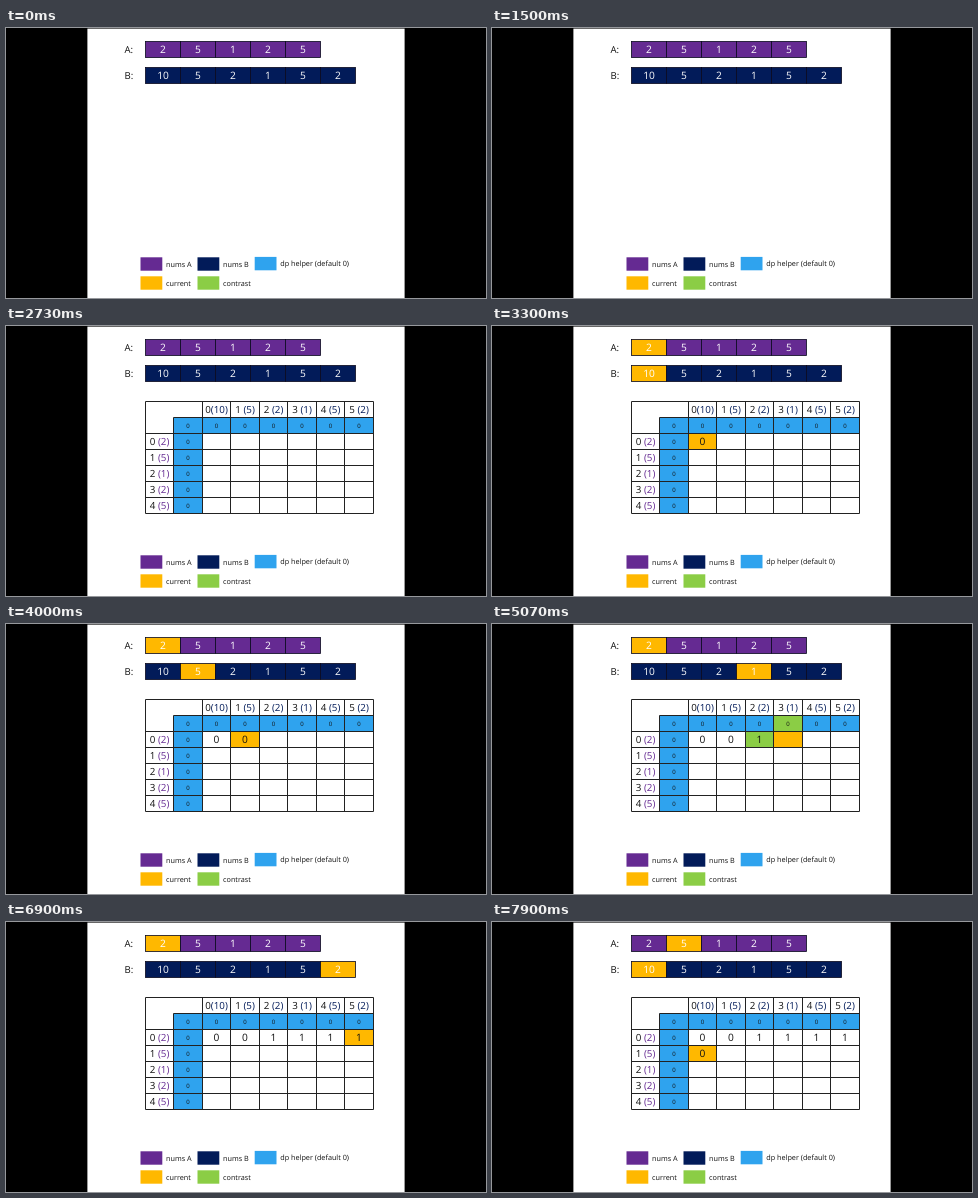
Recreate the animation shown at these times as an HTML page. Size 480 by 270 pixels, loop 8000 ms.

```html
<!DOCTYPE html>
<html lang="en">
<head>
<meta charset="utf-8">
<title>Longest common run table</title>
<style>
html, body { margin: 0; width: 100%; height: 100%; overflow: hidden; background: #000; }
svg { display: block; width: 100vw; height: 100vh; }
text { font-family: "Open Sans", "Noto Sans", sans-serif; text-rendering: geometricPrecision; }
</style>
</head>
<body>
<svg id="stage" viewBox="0 0 480 270"></svg>
<script>
const NS = "http://www.w3.org/2000/svg";
const PURPLE = "#652a92", NAVY = "#021b59", BLUE = "#2fa3ee", ORANGE = "#ffb800", GREEN = "#8bcd45";
const INK = "#111", LINE = "#222";
const A = [2, 5, 1, 2, 5], B = [10, 5, 2, 1, 5, 2];
const LOOP = 8000, TABLE_AT = 2050, CELLS_AT = 2800, STEP = 750, SOLVE = 330;

const stage = document.getElementById("stage");

function add(parent, tag, attrs, content = "") {
  const el = document.createElementNS(NS, tag);
  for (const key in attrs) el.setAttribute(key, attrs[key]);
  el.textContent = content;
  parent.appendChild(el);
  return el;
}

const box = (parent, x, y, width, height, fill) =>
  add(parent, "rect", { x, y, width, height, fill });

const label = (parent, x, y, size, fill, content, anchor = "middle") =>
  add(parent, "text", { x, y, fill, "font-size": size, "text-anchor": anchor }, content);

const rule = (parent, d) =>
  add(parent, "path", { d, fill: "none", stroke: LINE, "stroke-width": 1 });

// Centre of the pixel that holds v, for sharp one pixel lines.
const snap = v => Math.floor(v) + 0.5;

function drawArray(name, nums, y, fill) {
  label(stage, 118.5, y + 11.9, 9.6, INK, name + ":", "start");
  return nums.map((n, i) => {
    const left = snap(139 + i * 35.15), right = snap(139 + (i + 1) * 35.15);
    const cell = box(stage, left, y, right - left, 16, fill);
    cell.setAttribute("stroke", "#0b0a20");
    cell.setAttribute("stroke-width", 0.8);
    label(stage, (left + right) / 2, y + 11.9, 10.2, "#fff", n);
    return cell;
  });
}

function drawHeading(x, y, index, gap, value, color) {
  const text = label(table, x, y, 9.8, INK, index + gap);
  add(text, "tspan", { fill: color }, `(${value})`);
}

function drawLegend(x, y, color, name) {
  box(stage, x, y, 21.8, 13.4, color);
  label(stage, x + 25.6, y + 9.2, 7.25, INK, name, "start");
}

box(stage, 81.4, 0.6, 317.2, 270, "#fff");
const cellsA = drawArray("A", A, 13.5, PURPLE);
const cellsB = drawArray("B", B, 39.5, NAVY);

// Grid row 0 holds headings, row 1 and column 1 hold the zero helpers.
const table = add(stage, "g", {});
const colX = c => snap(139 + c * 28.5);
const rowY = r => 75.5 + r * 16;
const grid = [];
for (let r = 0; r < 7; r++) {
  grid.push([]);
  for (let c = 0; c < 8; c++) {
    const x = colX(c), y = rowY(r), w = colX(c + 1) - x;
    const mx = x + w / 2;
    const helper = r === 1 && c > 0 || c === 1 && r > 0;
    const base = helper ? BLUE : "#fff";
    const rect = box(table, x, y, w, 16, base);
    const text = helper ? label(table, mx, y + 10, 6, INK, "0")
                        : label(table, mx, y + 11.6, 10.2, INK, "");
    grid[r].push({ rect, text, base });
    if (r === 0 && c > 1) drawHeading(mx, y + 11.7, c - 2, c === 2 ? "" : " ", B[c - 2], NAVY);
    if (c === 0 && r > 1) drawHeading(mx, y + 11.7, r - 2, " ", A[r - 2], PURPLE);
  }
}

// The corner stays open between the headings.
for (let r = 0; r <= 7; r++) rule(table, `M${colX(r === 1 ? 1 : 0)} ${rowY(r)}H${colX(8)}`);
for (let c = 0; c <= 8; c++) rule(table, `M${colX(c)} ${rowY(c === 1 ? 1 : 0)}V${rowY(7)}`);

drawLegend(134.5, 229.3, PURPLE, "nums A");
drawLegend(191.5, 229.3, NAVY, "nums B");
drawLegend(248.7, 228.9, BLUE, "dp helper (default 0)");
drawLegend(134.5, 248.3, ORANGE, "current");
drawLegend(191.5, 248.3, GREEN, "contrast");

// Longest common subsequence lengths, padded with zeros.
const dp = [Array(B.length + 1).fill(0)];
A.forEach((a, i) => {
  const row = [0];
  B.forEach((b, j) => row.push(a === b ? dp[i][j] + 1 : Math.max(dp[i][j + 1], row[j])));
  dp.push(row);
});

const paint = (r, c, color) => grid[r][c].rect.setAttribute("fill", color);

function draw(t) {
  const elapsed = t - CELLS_AT;
  const k = Math.floor(elapsed / STEP);
  const solved = elapsed - k * STEP >= SOLVE;
  const active = k >= 0;
  const i = Math.floor(k / B.length), j = k - i * B.length;

  table.setAttribute("visibility", t >= TABLE_AT ? "visible" : "hidden");
  cellsA.forEach((el, n) => el.setAttribute("fill", active && n === i ? ORANGE : PURPLE));
  cellsB.forEach((el, n) => el.setAttribute("fill", active && n === j ? ORANGE : NAVY));

  grid.forEach((row, r) => row.forEach((cell, c) => {
    paint(r, c, cell.base);
    if (r < 2 || c < 2) return;
    const order = (r - 2) * B.length + c - 2;
    const known = order < k || order === k && solved;
    cell.text.textContent = known ? dp[r - 1][c - 1] : "";
  }));

  if (!active) return;
  paint(i + 2, j + 2, ORANGE);
  if (solved) return;
  if (A[i] === B[j]) {
    paint(i + 1, j + 1, GREEN);
  } else {
    paint(i + 1, j + 2, GREEN);
    paint(i + 2, j + 1, GREEN);
  }
}

const start = performance.now();
function tick() {
  draw((performance.now() - start) % LOOP);
  requestAnimationFrame(tick);
}
tick();
</script>
</body>
</html>
```
